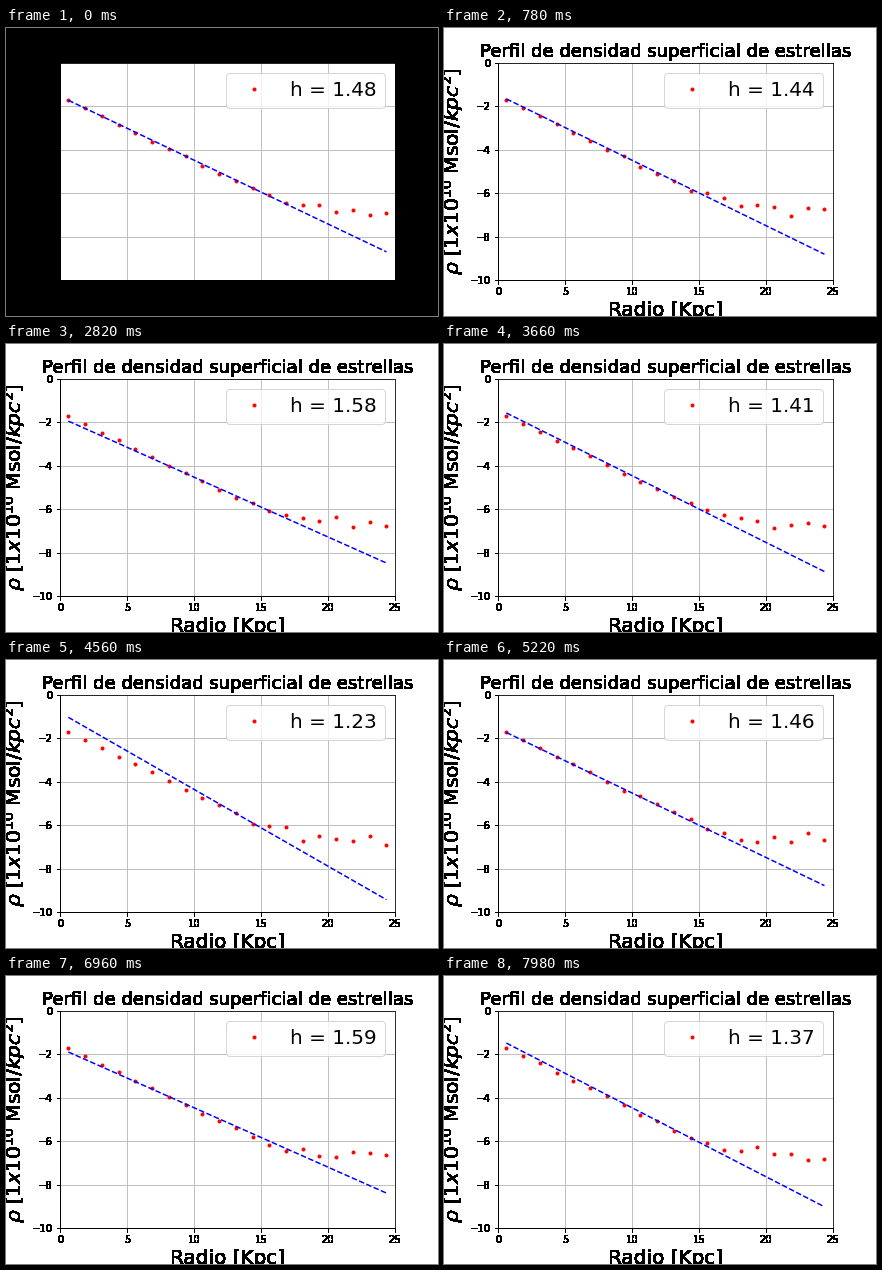
Write a matplotlib script that moves like this. It is 432 px wide and 288 px high and loops after 8 s.

```python
import numpy as np
import matplotlib.pyplot as plt
from matplotlib.animation import FuncAnimation

STEPS, TICKS, TICK_MS = 134, 400, 20   # a new profile every three ticks

plt.rcParams.update({
    "font.family": "DejaVu Sans", "font.size": 10,
    "figure.subplot.bottom": 0.125,
})

# Key moments of the fit: step, scale length, value at half radius
KEYS = np.array([
    (0, 1.48, -5.22), (20, 1.43, -5.25), (28, 1.54, -5.35), (37, 1.42, -5.25),
    (47, 1.58, -5.22), (76, 1.23, -5.24), (98, 1.70, -5.29),
    (116, 1.59, -5.15), (125, 1.24, -5.25), (133, 1.37, -5.26),
])


def eased(values):
    """Values at every step, easing in and out between key moments."""
    order = np.arange(len(KEYS))
    pos = np.interp(np.arange(STEPS), KEYS[:, 0], order)
    whole = np.floor(pos)
    part = pos - whole
    return np.interp(whole + part * part * (3 - 2 * part), order, values)


def harden(img, dpi):
    """Make every touched pixel opaque."""
    img[..., 3] = img[..., 3] > 0
    return img, 0, 0


h, mid = eased(KEYS[:, 1]), eased(KEYS[:, 2])

# Exponential disc over a faint floor, with scatter growing outwards
rng = np.random.default_rng(7)
radius = 0.625 + 1.25 * np.arange(20)
disc = np.log10(10 ** -(1.53 + 0.302 * radius) + 10 ** -6.72)
spread = 0.02 + 0.16 * (radius / 25) ** 2
density = disc + spread * rng.normal(size=(STEPS, 20))

fig, ax = plt.subplots(figsize=(6, 4), dpi=72)
dots, = ax.plot(radius, disc, "r.", label="h = 1.48")
fit, = ax.plot([], [], "b--")
ax.set(xlim=(0, 25), ylim=(-10, 0))
ax.grid(color="#c0c0c0", linewidth=1)
title = ax.set_title("Perfil de densidad superficial de estrellas", fontsize=18)
ax.set_xlabel("Radio [Kpc]", fontsize=20)
ax.set_ylabel(r"$\rho\ [1x10^{10}$ Msol$/kpc^2]$", fontsize=20)
legend = ax.legend(loc="upper right", fontsize=20)
ax.spines[["left", "bottom"]].set_linewidth(1)
for artist in (ax.xaxis, ax.yaxis, title):
    artist.set_agg_filter(harden)


def update(tick):
    k = tick // 3
    fig.set_facecolor("black" if k == 0 else "white")
    slope = np.log10(np.e) / h[k]
    dots.set_ydata(density[k])
    fit.set_data(radius, mid[k] - slope * (radius - 12.5))
    legend.get_texts()[0].set_text(f"h = {h[k]:.2f}")
    return dots, fit


anim = FuncAnimation(fig, update, frames=TICKS, interval=TICK_MS,
                     init_func=lambda: update(0), repeat=True, repeat_delay=0)
plt.show()
```
